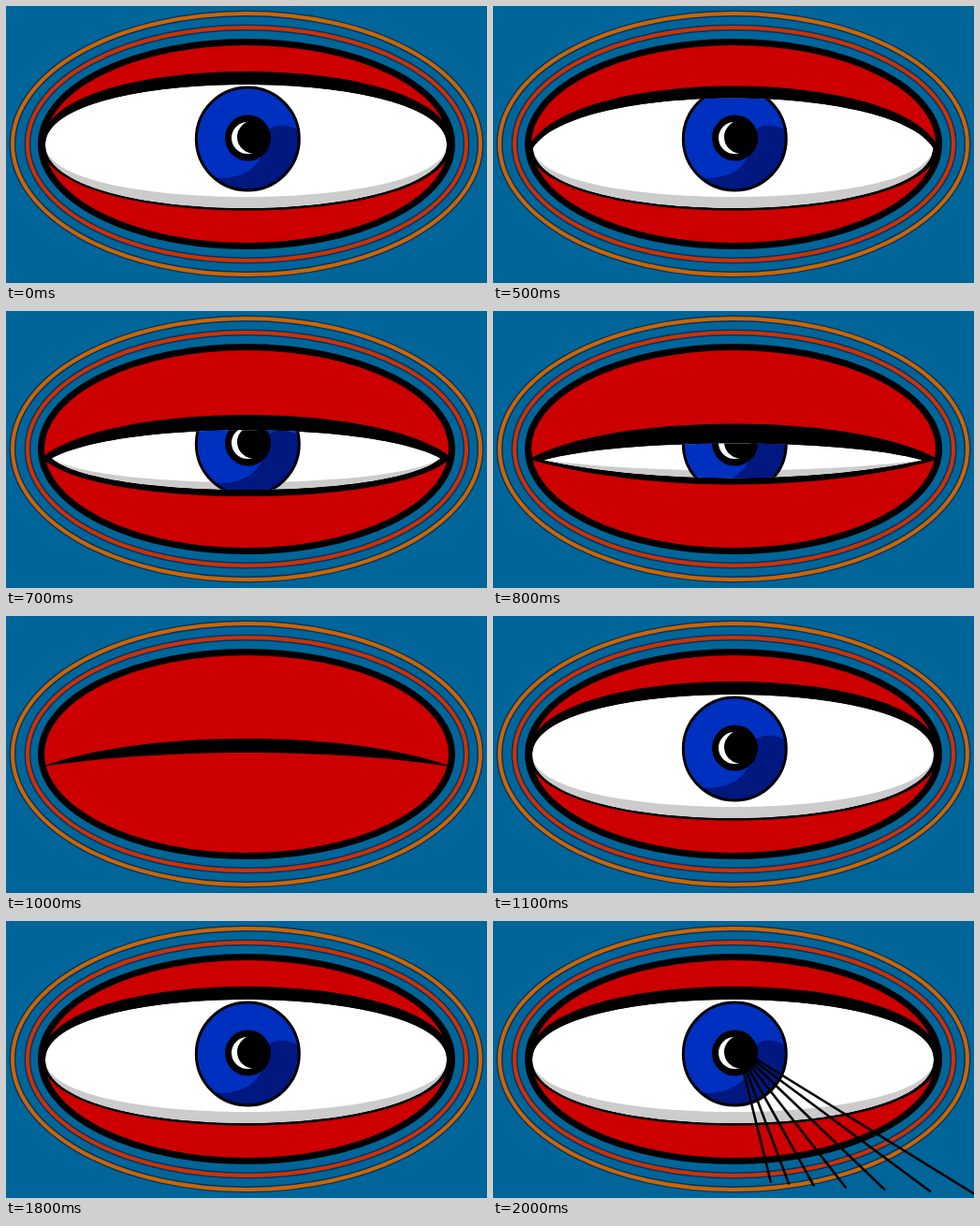
An HTML page that plays this animation: 514x296 px, repeating every 2500 ms.

```html
<!DOCTYPE html>
<html lang="en">
<head>
<meta charset="utf-8">
<title>Blinking eye</title>
<style>
  html, body { margin: 0; width: 100%; height: 100%; overflow: hidden; background: #069; }
  svg { display: block; width: 514px; height: 296px; }
  .ring { fill: none; stroke-width: 4; }
  .edge { fill: none; stroke: #036; stroke-width: 7; }
</style>
</head>
<body>
<svg viewBox="0 0 514 296">
  <defs>
    <clipPath id="socketClip"><ellipse cx="257" cy="147.5" rx="219.5" ry="109"/></clipPath>
    <clipPath id="openClip"><path id="openShape"/></clipPath>
    <clipPath id="irisClip"><circle cx="258" cy="142" r="55"/></clipPath>
  </defs>

  <ellipse class="edge" cx="257" cy="147.5" rx="250" ry="139.5"/>
  <ellipse class="ring" cx="257" cy="147.5" rx="250" ry="139.5" stroke="#c60"/>
  <ellipse class="edge" cx="257.5" cy="147.5" rx="234.5" ry="124.5"/>
  <ellipse class="ring" cx="257.5" cy="147.5" rx="234.5" ry="124.5" stroke="#c30"/>

  <ellipse cx="257" cy="147.5" rx="219.5" ry="109" fill="#c00"/>
  <path id="lids" clip-path="url(#socketClip)"/>
  <g id="ball" clip-path="url(#openClip)">
    <path id="white" fill="#fff"/>
    <path id="shade" fill="#ccc"/>
    <circle cx="258" cy="142" r="55" fill="#0030c0"/>
    <path clip-path="url(#irisClip)" fill="#001880"
      d="M220 183C252 187 278 172 276 140C281 125 300 124 314 134V200H220Z"/>
    <circle cx="258.3" cy="142" r="55" fill="none" stroke="#000" stroke-width="3"/>
    <circle cx="258.5" cy="141" r="24.5"/>
    <circle cx="258" cy="141" r="17" fill="#fff"/>
    <circle cx="264.5" cy="140" r="17.5"/>
  </g>
  <ellipse cx="257" cy="147.5" rx="219.5" ry="109" fill="none" stroke="#000" stroke-width="7"/>
  <path id="rays" stroke="#000" stroke-width="2.6"/>
</svg>
<script>
  const LOOP = 2500, STEPS = 6, BLINK = 500, STEP_MS = 100;
  const el = id => document.getElementById(id);

  // Closed shape between two arcs that share their corners; k sharpens the corners.
  function lens(left, right, corner, top, bottom, kTop, kBottom) {
    const pull = mid => (mid - corner / 4) / .75;
    const arc = (from, to, mid, k) => {
      const d = (to - from) * k;
      return `C${from + d} ${pull(mid)} ${to - d} ${pull(mid)} ${to} ${corner}`;
    };
    return `M${left} ${corner}${arc(left, right, top, kTop)}${arc(right, left, bottom, kBottom)}Z`;
  }

  // The upper lid falls from the first step, the lower one rises from the second.
  function showLids(step) {
    const c = step / STEPS;
    const ease = 1 - (1 - c) ** 1.6;
    const lift = 12.5 * Math.max(0, step - 1);
    const corner = 147 + 14 * ease;
    const upOut = 70 + 61 * ease;
    const upIn = 84 + 14.4 * step;
    const lowIn = 216 - lift;
    const closed = upIn > lowIn;
    const lowOut = closed ? upOut + 15 : lowIn + Math.min(7, 2.5 + lift * .4);
    const shade = lowIn - Math.max(8, 12 - lift / 4);
    const kUp = .25 * Math.sqrt(c);
    const kLow = Math.min(.3, c ** 3);
    const left = 42 + 27 * c * c, right = 513 - left;

    const open = lens(left, right, corner + 1, upIn, lowIn, kUp, kLow);
    el('lids').setAttribute('d', lens(38, 476, corner, upOut, lowOut, kUp, kLow));
    el('openShape').setAttribute('d', open);
    el('white').setAttribute('d', open);
    el('shade').setAttribute('d', lens(left, right, corner + 1, shade, lowIn, kLow, kLow));
    el('ball').style.display = closed ? 'none' : '';
  }

  // Seven lashes of light fan out with growing gaps.
  let fan = '';
  for (let i = 0; i < 7; i++) {
    const x = Math.min(514, 297 + 15.7 * i + 3.7 * i * i);
    fan += `M${266 + 1.8 * i} ${154 - 1.5 * i}L${x} ${279.5 + 2 * i}`;
  }
  el('rays').setAttribute('d', fan);

  let current = -1;
  function draw() {
    const t = performance.now() % LOOP;
    const n = Math.floor((t - BLINK) / STEP_MS) + 1;
    const step = n > 0 && n <= STEPS ? n : 0;
    if (step !== current) showLids(current = step);
    const rays = t >= 1300 && t < 1800 || t >= 2000;
    el('rays').style.display = rays ? '' : 'none';
    requestAnimationFrame(draw);
  }
  draw();
</script>
</body>
</html>
```
